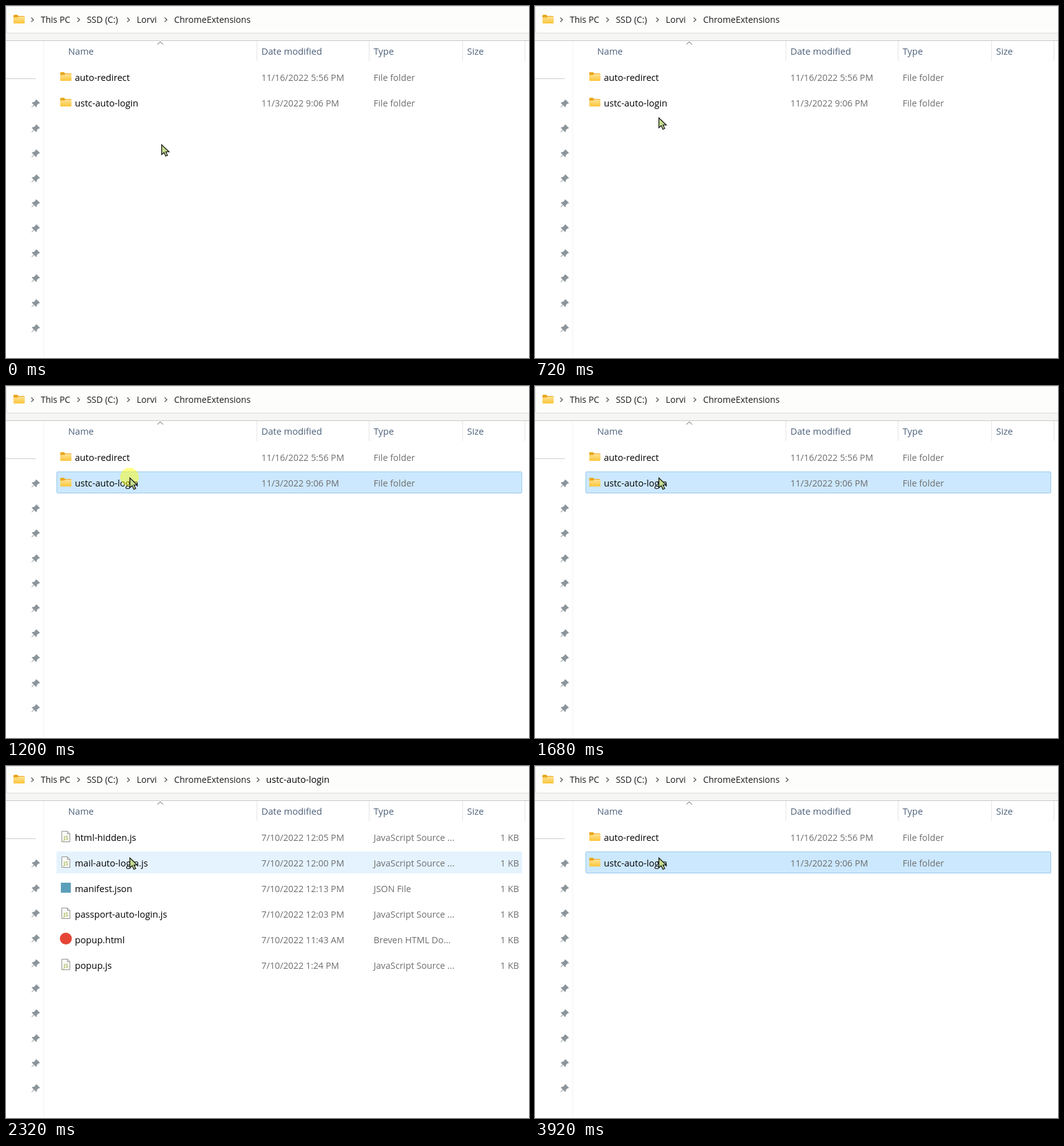
An HTML page that plays this animation: 839x564 px, repeating every 4080 ms.

```html
<!DOCTYPE html>
<html lang="en">
<head>
<meta charset="utf-8">
<title>File browser</title>
<style>
html, body { margin: 0; width: 100%; height: 100%; overflow: hidden; background: #fff; }
svg { display: block; width: 839px; height: 564px; font-family: "Open Sans", "Noto Sans", sans-serif; }
text { white-space: pre; }
.crumb { font-size: 14px; fill: #1b1b1b; }
.head { font-size: 14.7px; fill: #4c607a; }
.name { font-size: 14.6px; fill: #000; }
.date { font-size: 14.25px; fill: #6d6d6d; }
.type { font-size: 14.35px; fill: #6d6d6d; }
.line { fill: none; stroke: #e4e4e4; }
.chevron { fill: none; stroke: #555; stroke-width: 1.3; }
</style>
</head>
<body>
<svg id="stage" viewBox="0 0 839 564">
  <defs>
    <linearGradient id="gold" x2="0" y2="1">
      <stop stop-color="#ffe194"/><stop offset="1" stop-color="#fbc63a"/>
    </linearGradient>
    <g id="folder">
      <path d="M0 1.5Q0 0 1.5 0H6L8 2H16.5Q18 2 18 3.5V8H0Z" fill="#e9a820"/>
      <path d="M0 5.5Q0 4.5 1 4.5H6.5L8.3 3H17Q18 3 18 4V12.5Q18 14 16.5 14H1.5Q0 14 0 12.5Z" fill="url(#gold)"/>
    </g>
    <g id="script">
      <path d="M.5 .5H9.5L13.5 4.5V17.5H.5Z" fill="#f8f8f5" stroke="#929292"/>
      <path d="M9.5 .5V4.5H13.5" fill="none" stroke="#929292"/>
      <text x="3.2" y="13.6" font-size="9" font-weight="600" fill="#a3b548">JS</text>
    </g>
    <rect id="json" y="1" x="-1" width="16" height="16" fill="#5c9fba"/>
    <circle id="page" cx="7" cy="8.5" r="9.6" fill="#e64536"/>
    <path id="pin" fill="#8b959b" d="M1.5-6 7-.5 5.6 .6 4.5 .4 2 3 1.8 5.4 .6 6-2.3 3-6 6.6-6.6 6-3 2.3-6-.5-5.2-1.8-2.8-2 0-4.5V-5.5Z"/>
  </defs>
  <rect width="839" height="55" fill="#f6f6f4"/>
  <rect x=".5" y="-.5" width="850" height="44" rx="4" fill="#fdfdfc" stroke="#dadada"/>
  <path class="line" d="M0 .5H839" style="stroke:#dedede"/>
  <path class="line" d="M0 55.5H839" style="stroke:#c6c6c6"/>
  <path class="line" d="M402.5 56V88M582.5 56V88M732.5 56V88M832.5 56V88"/>
  <path class="line" d="M60.5 56V563" style="stroke:#f2f2f2"/>
  <path class="line" d="M0 116.5H48" style="stroke:#cfcfcf"/>
  <path class="chevron" d="M243 61.7 247.5 57.2 252 61.7" style="stroke-width:1"/>
  <use href="#folder" x="12" y="14"/>
  <g id="fixed"></g>
  <rect id="bar" x="81" y="137" width="747" height="35"/>
  <g id="folders"></g>
  <g id="files"></g>
  <circle id="click" cx="198" cy="146" r="15" fill="#ff0" fill-opacity=".47"/>
  <path id="cursor" d="M0 0V15.8L3.8 12.4 6.5 18.3 9.4 17 6.7 11.4H12Z" fill="#c4dc8e" stroke="#1c1c1c" stroke-width="1.3"/>
</svg>
<script>
const $ = id => document.getElementById(id);
const label = (cls, x, y, s, anchor = "start") =>
  `<text class="${cls}" x="${x}" y="${y}" text-anchor="${anchor}">${s}</text>`;
const chevron = (x, id = "") => `<path class="chevron" id="${id}" d="M${x - 1.5} 18.5 ${x + 2.1} 22 ${x - 1.5} 25.5"/>`;

const crumbs = [[56, "This PC"], [130, "SSD (C:)"], [210, "Lorvi"], [270, "ChromeExtensions"]];
const heads = [[100, "Name"], [410, "Date modified"], [590, "Type"], [740, "Size"]];
$("fixed").innerHTML =
  crumbs.map(([x, s]) => chevron(x - 14) + label("crumb", x - .3, 27, s)).join("") +
  chevron(404, "nextChevron") +
  `<g id="lastCrumb">${label("name", 417.3, 27, "ustc-auto-login")}</g>` +
  heads.map(([x, s]) => label("head", x - .3, 78, s)).join("") +
  Array.from({ length: 10 }, (_, i) => `<use href="#pin" x="47.5" y="${156 + 40 * i}"/>`).join("");

const row = ([icon, name, date, type, size = ""], i) => {
  const y = 120 + 41 * i, isFolder = icon === "folder";
  return `<use href="#${icon}" x="${isFolder ? 87 : 89}" y="${y - (isFolder ? 14 : 16)}"/>` +
    label("name", 110.5, y, name) + label("date", 409.8, y, date) +
    label("type", 589.8, y, type) + label("type", 823, y, size, "end");
};
$("folders").innerHTML = [
  ["folder", "auto-redirect", "11/16/2022 5:56 PM", "File folder"],
  ["folder", "ustc-auto-login", "11/3/2022 9:06 PM", "File folder"],
].map(row).join("");

const source = "JavaScript Source ...";
$("files").innerHTML = [
  ["script", "html-hidden.js", "7/10/2022 12:05 PM", source, "1 KB"],
  ["script", "mail-auto-login.js", "7/10/2022 12:00 PM", source, "1 KB"],
  ["json", "manifest.json", "7/10/2022 12:13 PM", "JSON File", "1 KB"],
  ["script", "passport-auto-login.js", "7/10/2022 12:03 PM", source, "1 KB"],
  ["page", "popup.html", "7/10/2022 11:43 AM", "Breven HTML Do...", "1 KB"],
  ["script", "popup.js", "7/10/2022 1:24 PM", source, "1 KB"],
].map(row).join("");

// Pointer positions, each held until the next: time, x, y
const path = [
  [0, 249.7, 222.3], [320, 248, 226], [360, 242, 231], [400, 233, 230], [440, 224, 222],
  [520, 213, 207], [640, 203, 190], [720, 198.7, 179.3], [800, 198.7, 169], [880, 198.7, 155], [920, 198.7, 147.3],
];
const show = (id, on) => $(id).setAttribute("visibility", on ? "visible" : "hidden");

function draw(t) {
  const within = (a, b) => t >= a && t < b;
  const [, x, y] = path.findLast(p => p[0] <= t);
  $("cursor").setAttribute("transform", `translate(${x} ${y})`);

  const inside = within(2200, 3560);
  show("lastCrumb", inside);
  show("nextChevron", inside || t >= 3920);
  show("folders", t < 2200 || t >= 3640);
  show("files", within(2240, 3560));
  show("click", within(1200, 1400));

  const selected = within(1200, 2200) || t >= 3640;
  const bar = $("bar"), edge = selected ? .5 : 0;
  show("bar", selected || within(800, 1200) || within(2320, 3560));
  bar.setAttribute("fill", selected ? "#cce8ff" : "#e5f3ff");
  bar.setAttribute("stroke", selected ? "#99c9e8" : "none");
  bar.setAttribute("rx", selected ? 1.5 : 0);
  bar.setAttribute("x", 81 + edge);
  bar.setAttribute("y", 137 + edge);
  bar.setAttribute("width", 747 - 2 * edge);
  bar.setAttribute("height", 35 - 2 * edge);
}

let start;
function tick(now) {
  start ??= now;
  draw((now - start) % 4080);
  requestAnimationFrame(tick);
}
draw(0);
requestAnimationFrame(tick);
</script>
</body>
</html>
```
